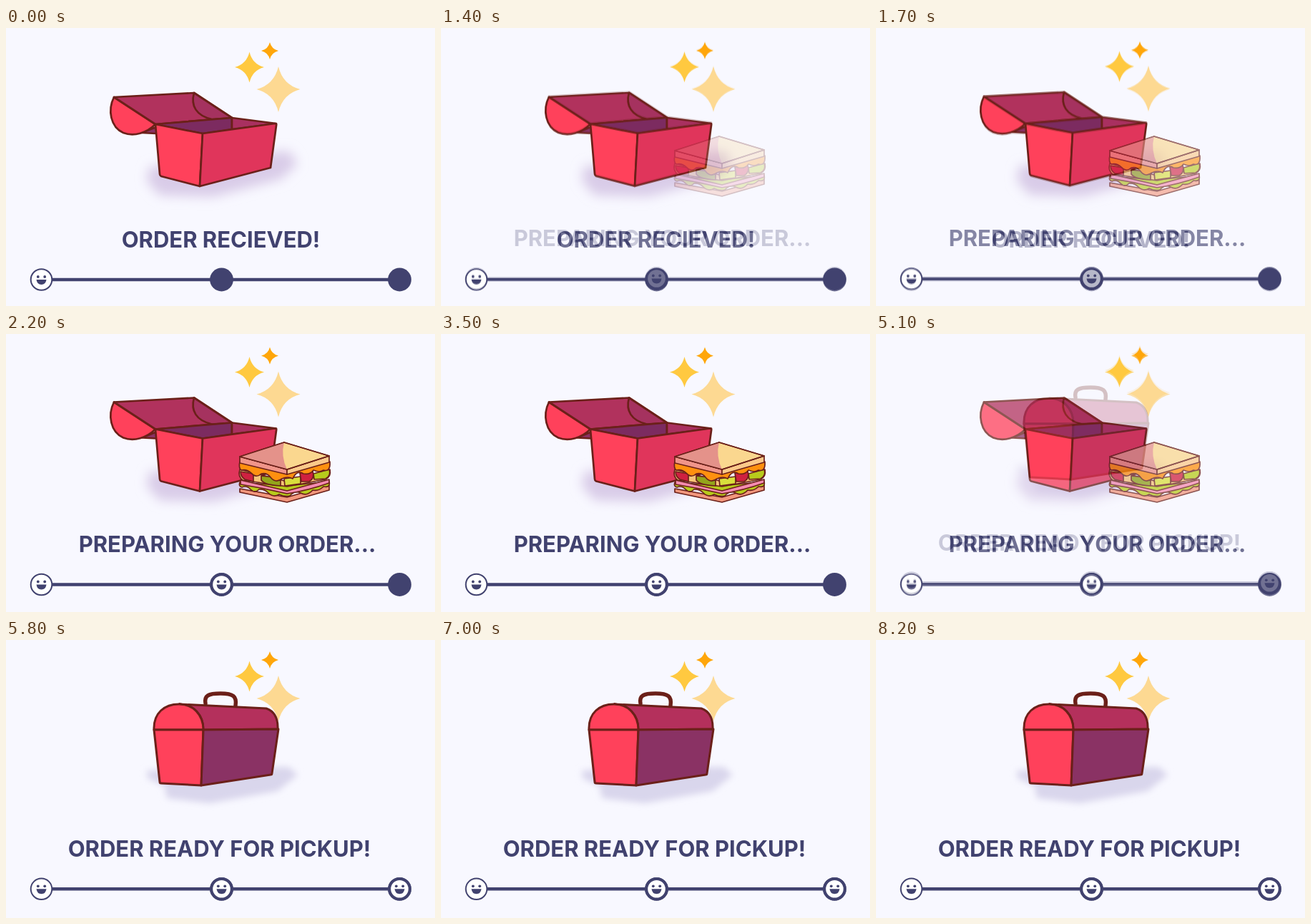
Animation of 600 by 390 pixels, one loop 8300 ms. Source, as an HTML page:

```html
<!DOCTYPE html>
<html lang="en">
<head>
<meta charset="utf-8">
<title>Order progress</title>
<style>
  html, body { margin: 0; width: 100%; height: 100%; overflow: hidden; background: #f8f8ff; }
  svg { display: block; width: 600px; height: 390px; }
  text { font: 700 31px Inter, sans-serif; text-anchor: middle; fill: #41426f; }
  .ink { stroke: #6b2019; stroke-width: 2.7; stroke-linejoin: round; stroke-linecap: round; }
  .thin { stroke: #6b2019; stroke-width: 1.7; stroke-linejoin: round; }
</style>
</head>
<body>
<svg viewBox="0 0 600 390">
  <defs>
    <filter id="soft" x="-20%" y="-50%" width="140%" height="200%"><feGaussianBlur stdDeviation="8"/></filter>
    <filter id="softer" x="-20%" y="-50%" width="140%" height="200%"><feGaussianBlur stdDeviation="5"/></filter>

    <path id="star" d="M0-1Q.2-.2 1 0Q.2 .2 0 1Q-.2 .2-1 0Q-.2-.2 0-1Z"/>
    <g id="stars">
      <use href="#star" transform="translate(340.5 55) scale(20.5 21.5)" fill="#ffc940"/>
      <use href="#star" transform="translate(369 32) scale(12)" fill="#ffa60a"/>
      <use href="#star" transform="translate(381 86) scale(30.5 32)" fill="#fdd992"/>
    </g>

    <g id="openBox">
      <path d="M200 195L395 172L408 190L385 212L290 237L215 235L197 215Z" fill="#d9cce8" filter="url(#soft)"/>
      <g class="ink">
        <path d="M190 147L210 148L215 137Z" fill="#8a3264"/>
        <path d="M151 97C142 115 146 139 164 147C179 153 197 147 209 135Z" fill="#ff415b"/>
        <path d="M151 97L263 91L316 126L209 135Z" fill="#b1325d"/>
        <path d="M263 91C258 109 266 123 288 128L316 126Z" fill="#a5325f"/>
        <path d="M209 135L316 126L316 142L275 148Z" fill="#7c2b60"/>
        <path d="M316 126L378 134L316 142Z" fill="#a93060"/>
        <path d="M209 135L275 148L271 222L217 208Q215 207 215 205Z" fill="#ff415b"/>
        <path d="M275 148L376 134Q379 134 378 137L370 196L271 222Z" fill="#e0355b"/>
      </g>
    </g>

    <g id="sandwich" class="thin">
      <path d="M327 217L393 229L452 212V219L393 236L327 222Z" fill="#f2977d"/>
      <path d="M327 208Q325 214 330 215Q337 212 342 218Q348 224 354 218Q361 217 367 223Q374 230 382 225Q390 229 397 227Q404 219 412 223Q421 228 429 219Q437 221 444 214Q454 216 452 207L393 213Z" fill="#b7cb1c"/>
      <path d="M328 205L393 220L452 204V209Q421 220 393 224Q360 216 328 211Z" fill="#f48bb0"/>
      <path d="M327 190L393 207L453 190Q455 200 447 204L393 214L331 205Q324 200 327 190Z" fill="#f6c478"/>
      <path d="M328 193L346 196V207L334 204Q328 200 328 193Z" fill="#cf2140"/>
      <path d="M357 199L384 202V213Q362 212 357 205Z" fill="#93a51b"/>
      <path d="M389 203L412 200V210L390 213Z" fill="#d9df3c"/>
      <path d="M411 195L429 192Q432 203 424 207L413 207Z" fill="#cf2140"/>
      <path d="M430 196L452 190Q455 199 447 203L431 204Z" fill="#b7cb1c"/>
      <path d="M327 179Q325 188 329 191Q337 189 343 195Q350 203 357 196Q365 194 370 201Q377 210 386 203Q394 199 401 203Q407 190 416 196Q425 198 430 191Q439 195 444 191Q454 194 453 179L393 186Z" fill="#ff900f"/>
      <path d="M327 172L393 190V197L327 181Z" fill="#f0958a"/>
      <path d="M393 190L452 171V180L393 197Z" fill="#fbc98a"/>
      <path d="M327 172L389 152L452 171L393 190Z" fill="#fad78f"/>
      <path d="M327 172L389 152Q384 171 393 190Z" fill="#e4928a" stroke="none"/>
      <path d="M327 172L389 152L452 171L393 190Z" fill="none"/>
    </g>

    <g id="closedBox">
      <path d="M197 183L395 178L408 189L380 212L285 229L225 222L222 205L198 194Z" fill="#d9d6ec" filter="url(#softer)"/>
      <use href="#stars" y="-4"/>
      <path d="M279 89C277 78 283 75 300 75C318 75 323 79 321 92" class="ink" fill="none" style="stroke-width:5.5"/>
      <g class="ink" style="stroke-width:3">
        <path d="M242 90L364 96Q381 102 380 125L276 126C276 105 262 90 242 90Z" fill="#b4305c"/>
        <path d="M207 126C206 102 222 90 242 90C262 90 276 105 276 126Z" fill="#ff415b"/>
        <path d="M207 126H276L273 204L217 201Q215 201 215 199Z" fill="#ff415b"/>
        <path d="M276 126L381 125L372 187Q372 189 370 189L273 204Z" fill="#8a3264"/>
      </g>
    </g>

    <g id="smile" fill="#41426f">
      <circle cx="-4.7" cy="-4" r="1.9"/><circle cx="4.7" cy="-4" r="1.9"/>
      <path d="M-7 0H7Q6 7 0 7T-7 0Z"/>
    </g>
    <g id="face">
      <circle r="14.3" fill="#fff" stroke="#41426f" stroke-width="4"/>
      <use href="#smile"/>
    </g>
    <g id="track">
      <path d="M50 353H550" stroke="#41426f" stroke-width="4.6"/>
      <g fill="#41426f"><circle cx="301.5" cy="353" r="16.4"/><circle cx="550.5" cy="353" r="16.4"/></g>
      <circle cx="49.5" cy="353" r="14.8" fill="#fff" stroke="#41426f" stroke-width="2"/>
      <use href="#smile" x="49.5" y="353"/>
    </g>
    <rect id="paper" width="600" height="390" fill="#f8f8ff"/>
  </defs>

  <g>
    <use href="#paper"/><use href="#stars"/><use href="#openBox"/><use href="#track"/>
    <text x="300.5" y="307.5">ORDER RECIEVED!</text>
  </g>
  <g id="preparing">
    <use href="#paper"/>
    <g transform="translate(0 -1.5)">
      <use href="#stars"/><use href="#openBox"/><use href="#track"/>
      <use href="#face" x="301.5" y="353"/>
    </g>
    <use href="#sandwich"/>
    <text x="309.5" y="306">PREPARING YOUR ORDER...</text>
  </g>
  <g id="ready">
    <use href="#paper"/><use href="#closedBox"/>
    <g transform="translate(0 -3.7)">
      <use href="#track"/>
      <use href="#face" x="301.5" y="353"/><use href="#face" x="550.5" y="353"/>
    </g>
    <text x="298.5" y="304">ORDER READY FOR PICKUP!</text>
  </g>
</svg>
<script>
  const LOOP = 8300, STEP = 100, FADE = 800;
  const scenes = [['preparing', 1200], ['ready', 4900]]
    .map(([id, start]) => ({ style: document.getElementById(id).style, start }));

  function draw(now) {
    const t = Math.floor(now % LOOP / STEP) * STEP;
    for (const { style, start } of scenes) {
      style.opacity = Math.min(1, Math.max(0, (t - start) / FADE));
    }
    requestAnimationFrame(() => draw(performance.now() - begin));
  }
  const begin = performance.now();
  draw(0);
</script>
</body>
</html>
```
